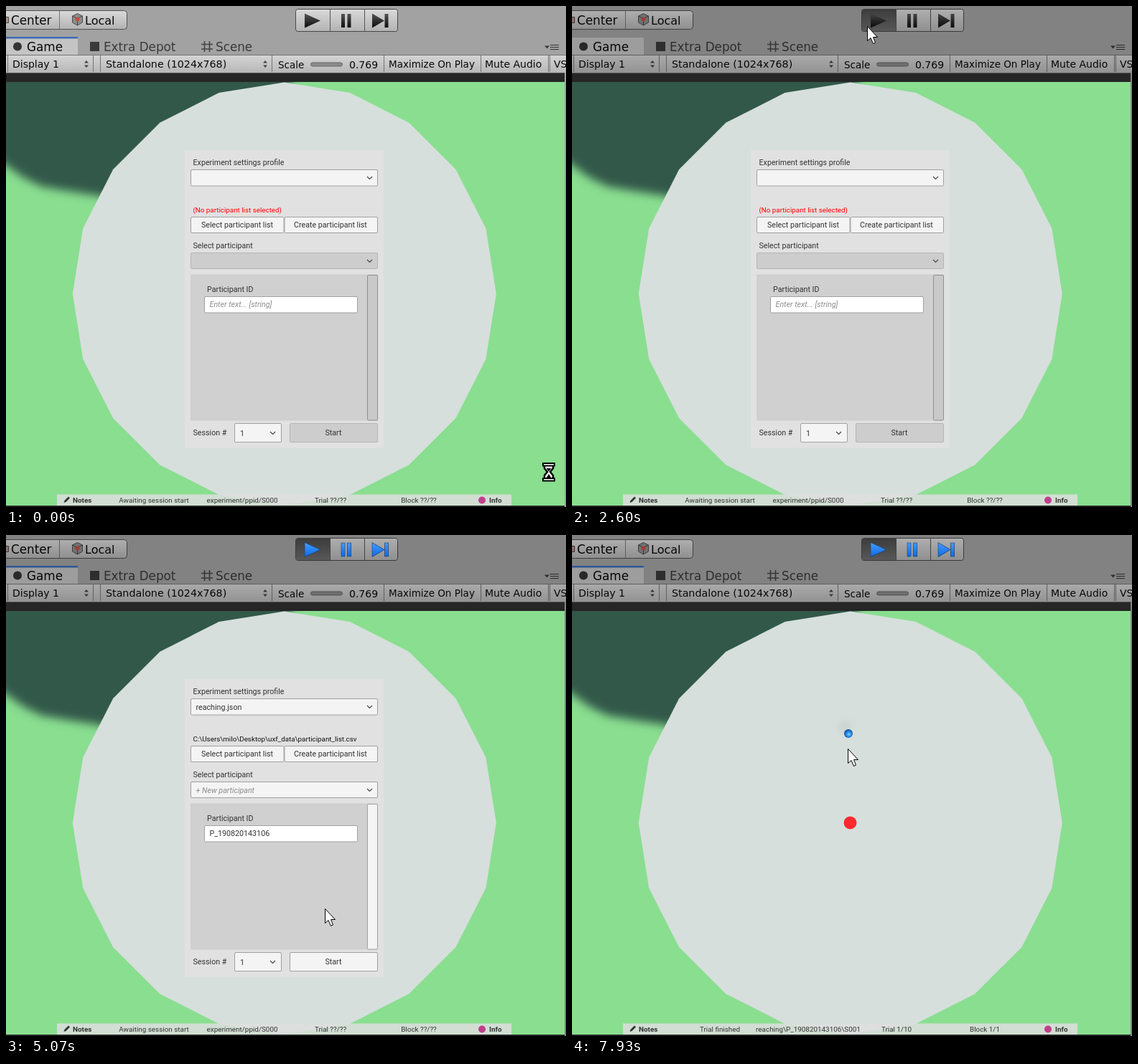
An HTML page that plays this animation: 780 px wide and 699 px high, repeating every 8000 ms.

```html
<!DOCTYPE html>
<html lang="en">
<head>
<meta charset="utf-8">
<title>Reaching experiment</title>
<style>
html, body { margin: 0; width: 100%; height: 100%; overflow: hidden; background: #a2a2a2; }
svg { display: block; width: 780px; height: 699px; }
.chrome { font: 14px "DejaVu Sans", sans-serif; fill: #080808; }
.big { font-size: 16.8px; }
.ui { font: 10.7px Roboto, sans-serif; fill: #323232; }
.small { font-size: 9.8px; }
.bar { font-size: 9.9px; }
.bold { font-weight: bold; }
.hint { font-style: italic; fill: #8c8c8c; }
.mid { text-anchor: middle; }
.box { fill: #f4f4f4; stroke: #a0a0a0; }
.off { fill: #cdcdcd; stroke: #b5b5b5; }
.track { fill: #c9c9c9; stroke: #8f8f8f; }
.chev { fill: none; stroke: #444; stroke-width: 1.2; }
.sep { stroke: #757575; fill: none; }
</style>
</head>
<body>
<svg viewBox="0 0 780 699">
  <defs>
    <linearGradient id="row" x2="0" y2="1"><stop stop-color="#d4d4d4"/><stop offset="1" stop-color="#b7b7b7"/></linearGradient>
    <linearGradient id="btn" x2="0" y2="1"><stop stop-color="#dadada"/><stop offset="1" stop-color="#b2b2b2"/></linearGradient>
    <linearGradient id="down" x2="0" y2="1"><stop stop-color="#4c4c4c"/><stop offset="1" stop-color="#6e6e6e"/></linearGradient>
    <linearGradient id="ink" x2="0" y2="1"><stop stop-color="#555"/><stop offset="1" stop-color="#0c0c0c"/></linearGradient>
    <linearGradient id="glow" x2="0" y2="1"><stop stop-color="#459cff"/><stop offset="1" stop-color="#0c6ae4"/></linearGradient>
    <radialGradient id="sphere" cx=".55" cy=".58"><stop stop-color="#8ad0ff"/><stop offset=".5" stop-color="#2a92ee"/><stop offset="1" stop-color="#14589f"/></radialGradient>
    <filter id="soft" x="-20%" y="-20%" width="140%" height="140%"><feGaussianBlur stdDeviation="6.500"/></filter>
    <filter id="puff" x="-50%" y="-50%" width="200%" height="200%"><feGaussianBlur stdDeviation="4"/></filter>
    <clipPath id="view"><path d="M0 106H778V697H0z"/></clipPath>
    <path id="arrows" d="M0-1.5l3-3.5 3 3.5zM0 1.5l3 3.5 3-3.5z" fill="#444"/>
    <g id="transport">
      <path d="M416 10.500L438 20.500L416 30.500z"/>
      <path d="M467 11h5v19h-5zM475.500 11h5v19h-5z"/>
      <path d="M510 10.500L527 20.500L510 30.500zM527.500 11h5v19h-5z"/>
    </g>
  </defs>

  <rect width="780" height="699" fill="#a2a2a2"/>

  <!-- editor toolbar -->
  <g class="chrome">
    <rect x="-6" y="6.500" width="174.500" height="26" rx="4" fill="url(#btn)" stroke="#505050"/>
    <path class="sep" d="M74.500 7V32"/>
    <path d="M-2 15.500H3.500V23.500H-2" fill="#b98c88" stroke="#444"/>
    <text class="big" x="7" y="26">Center</text>
    <path d="M99.500 10.500l7 3.500v9l-7 4-7-4v-9z" fill="#8d8d8d" stroke="#4c4c4c"/>
    <path d="M92.500 14l7 3.500 7-3.500M99.500 17.500V27" fill="none" stroke="#444"/>
    <circle cx="99.500" cy="18.500" r="2.800" fill="#d0463c"/>
    <text x="110" y="26" font-size="16">Local</text>

    <rect x="403.500" y="4.500" width="142" height="31" rx="3" fill="url(#btn)" stroke="#484848"/>
    <path id="pressed" d="M404 6q0-1 2-1H451V35H406q-2 0-2-2z" fill="url(#down)"/>
    <path d="M451.500 5V35M499.500 5V35" stroke="#555"/>
    <use href="#transport" fill="url(#ink)"/>

    <rect y="44" width="100" height="26" fill="#c4c4c4"/>
    <rect id="focus" y="43" width="100" height="2.500" fill="#3b6cb9"/>
    <circle cx="16" cy="56.500" r="6" fill="#333"/>
    <text class="big" x="29" y="63">Game</text>
    <g fill="#3a3a3a">
      <rect x="117" y="50" width="13" height="13"/>
      <text class="big" x="136" y="63">Extra Depot</text>
      <path d="M276.500 49V64M283.500 49V64M272 53.500H288M272 60H288" stroke="#444" stroke-width="1.600"/>
      <text class="big" x="292" y="63">Scene</text>
      <path d="M750 55.500h7l-3.500 4z"/>
      <path d="M758 54.500h12M758 57.500h12M758 60.500h12" stroke="#333"/>
    </g>

    <rect y="69" width="780" height="24" fill="url(#row)"/>
    <path class="sep" d="M0 68.500H780M2.500 69V92M121.500 69V92M131.500 69V92M370.500 69V92M526.500 69V92M661.500 69V92M755.500 69V92M757.500 69V92"/>
    <text x="9" y="86">Display 1</text>
    <use href="#arrows" x="109" y="81"/>
    <text x="139" y="86" font-size="14.250">Standalone (1024x768)</text>
    <use href="#arrows" x="358" y="81"/>
    <text x="379" y="87" font-size="13.500">Scale</text>
    <rect x="424.500" y="79" width="44" height="5" rx="2.500" fill="#8b8b8b" stroke="#666"/>
    <text x="478" y="87">0.769</text>
    <text x="533" y="86" font-size="13.500">Maximize On Play</text>
    <text x="667" y="86">Mute Audio</text>
    <text x="763" y="86">VSync</text>
  </g>
  <g id="tint">
    <rect width="780" height="93" fill="#000" opacity=".2"/>
    <rect x="778" y="93" width="2" height="606" fill="#828282"/>
  </g>
  <use id="live" href="#transport" fill="url(#glow)" stroke="#1c3f6b" stroke-width=".6"/>

  <!-- game view -->
  <rect y="93" width="778" height="13" fill="#262626"/>
  <path d="M0 93.500H778" stroke="#555"/>
  <rect y="106" width="778" height="591" fill="#8ade90"/>
  <g clip-path="url(#view)">
    <path filter="url(#soft)" fill="#31594a" d="M-40 60H396V300L200 282L130 265L85 258L50 252L25 240L0 222L-40 194z"/>
    <polygon id="disc" fill="#d6dfdc"/>
  </g>
  <rect y="697" width="778" height="2" fill="#262626"/>

  <circle id="home" cx="387.500" cy="401.500" r="9"/>
  <circle id="target" cx="387.500" cy="287" r="9" fill="#f4f4f4"/>
  <ellipse id="burst" cx="380" cy="267" rx="9" ry="8" fill="#c3cdc9" filter="url(#puff)"/>
  <circle id="ball" r="6" fill="url(#sphere)"/>

  <!-- start-up panel -->
  <g id="panel" class="ui">
    <rect x="249" y="201" width="277" height="415.500" fill="#e1e1e1"/>
    <rect class="box" x="257.500" y="228.500" width="260" height="22.500" rx="1.500"/>
    <rect class="box" x="257.500" y="294.500" width="129.500" height="22" rx="1.500"/>
    <rect class="box" x="388" y="294.500" width="129.500" height="22" rx="1.500"/>
    <rect id="picker" x="257.500" y="344.500" width="260" height="22" rx="1.500"/>
    <rect class="box" x="318.500" y="582.500" width="65" height="26" rx="1.500"/>
    <rect id="start" x="395.500" y="582.500" width="122" height="26" rx="1.500"/>
    <path class="chev" d="M503 238l3.500 3.500 3.500-3.500M503 354l3.500 3.500 3.500-3.500M368 594l3.500 3.500 3.500-3.500"/>
    <g id="words">
      <rect x="257" y="374.500" width="261" height="204" fill="#d0d0d0"/>
      <rect id="scroll" x="503.500" y="375.500" width="14" height="202.500" rx="1.500"/>
      <rect x="276.500" y="405.500" width="213" height="22.500" rx="1.500" fill="#fff" stroke="#a0a0a0"/>
      <text x="260.500" y="222">Experiment settings profile</text>
      <text x="272" y="309">Select participant list</text>
      <text x="401" y="309">Create participant list</text>
      <text x="260.500" y="338">Select participant</text>
      <text x="280" y="399">Participant ID</text>
      <text x="260.500" y="599">Session #</text>
      <text x="326" y="599.500">1</text>
      <text class="mid" x="456" y="599">Start</text>
      <g id="empty">
        <text class="small" x="260.500" y="287.500" fill="#f00">(No participant list selected)</text>
        <text class="hint" x="283.500" y="420">Enter text... [string]</text>
      </g>
      <g id="filled">
        <text x="264.500" y="244">reaching.json</text>
        <text class="small" x="260.500" y="287.500" fill="#111">C:\Users\milo\Desktop\uxf_data\participant_list.csv</text>
        <text class="hint" x="264.500" y="359.500">+ New participant</text>
        <text x="283.500" y="420">P_190820143106</text>
      </g>
    </g>
  </g>

  <!-- status bar -->
  <rect x="71" y="681.500" width="633" height="15.500" fill="#dfdfdf" opacity=".86"/>
  <path d="M80.500 693l1-3 5.500-5.500 2 2-5.500 5.500z" fill="#333"/>
  <circle cx="663" cy="689.500" r="5" fill="#c0408c"/>
  <g id="status" class="ui bar">
    <text class="bold" x="93" y="693">Notes</text>
    <text class="mid" id="phase" x="206" y="693"></text>
    <text class="mid" id="folder" x="329" y="693"></text>
    <text class="mid" id="trial" x="452" y="693"></text>
    <text class="mid" id="block" x="575" y="693"></text>
    <text class="bold" x="673" y="693">Info</text>
  </g>

  <g id="cursor">
    <path id="arrow" d="M.5.500V20.500L5 16.500L8.500 24.500L11.500 23L8.500 15.500H14.500z" fill="#fff" stroke="#000"/>
    <g id="wait" stroke="#000" fill="#fff">
      <path d="M3 3V8L7 13L3 18V23H15V18L11 13L15 8V3z" stroke-width="2.500"/>
      <path d="M1 1h16v3.500h-16zM1 22h16v3.500h-16z" stroke-width="2"/>
      <path d="M5.500 8h7L9 12.500zM5.500 21.500L9 16l3.500 5.500z" fill="#000" stroke="none"/>
    </g>
  </g>
</svg>
<script>
const $ = id => document.getElementById(id);
const show = (id, on) => $(id).style.display = on ? '' : 'none';
const move = (id, [x, y]) => $(id).setAttribute('transform', `translate(${x} ${y})`);
const style = (id, name) => $(id).setAttribute('class', name);

$('disc').setAttribute('points', Array.from({ length: 20 }, (_, i) => {
  const a = i * Math.PI / 10;
  return [387.8 + 295 * Math.cos(a), 401.5 + 295 * Math.sin(a)];
}).join(' '));

// Waypoints: time in ms, x, y
const cursorPath = [
  [0, 747, 637], [867, 405, 24], [933, 411, 19], [2533, 411, 19], [2600, 411, 28],
  [3400, 401, 183], [3867, 393, 221], [4200, 392, 236], [4333, 394, 240],
  [4800, 425, 400], [5067, 444, 521], [5133, 447, 556], [5333, 453, 583],
  [5933, 453, 585], [6000, 447, 574], [6733, 393, 398], [7400, 393, 398], [7933, 384, 298]
];
const ballPath = [[0, 455, 582], [6000, 455, 582], [6733, 391, 402], [7400, 391, 402], [7933, 385, 277]];

function at(path, t) {
  const i = path.findIndex(p => p[0] > t);
  if (i < 0) return path.at(-1).slice(1);
  const [t0, x0, y0] = path[i - 1], [t1, x1, y1] = path[i];
  const k = (t - t0) / (t1 - t0);
  return [x0 + (x1 - x0) * k, y0 + (y1 - y0) * k];
}

function draw(t) {
  const playing = t > 1390, live = t > 4300, session = t > 5460;
  const amber = t > 6720, go = t > 7260, done = t > 7860;
  const blank = t > 60 && !playing || t > 4190 && !live;

  show('tint', playing);
  show('pressed', playing);
  show('live', live);
  show('focus', !playing || t > 4190);

  show('words', !blank);
  show('status', !blank);
  show('empty', !live);
  show('filled', live);
  style('picker', live ? 'box' : 'off');
  style('start', live ? 'box' : 'off');
  style('scroll', live ? 'box' : 'track');
  $('panel').style.opacity = Math.max(0, Math.min(1, (5667 - t) / 267));

  $('phase').textContent = done ? 'Trial finished' : go ? 'Trial in progress'
    : session ? 'Awaiting trial start' : 'Awaiting session start';
  $('folder').textContent = session ? 'reaching\\P_190820143106\\S001' : 'experiment/ppid/S000';
  $('trial').textContent = go ? 'Trial 1/10' : 'Trial ??/??';
  $('block').textContent = go ? 'Block 1/1' : 'Block ??/??';

  show('home', session);
  $('home').setAttribute('fill', done || !amber ? '#ff2a2e' : go ? '#2fd04a' : '#ffb020');
  show('target', go && !done);
  show('burst', done);
  $('burst').style.opacity = t > 7900 ? .6 : 1;
  show('ball', session);
  move('ball', at(ballPath, t));

  show('cursor', t < 1120 || playing);
  show('wait', t < 60);
  show('arrow', t > 60);
  move('cursor', at(cursorPath, t).map(Math.round));
}

function tick() {
  const t = performance.now() % 8000;
  draw(Math.round(Math.floor((t + 4) * .015) / .015));
  requestAnimationFrame(tick);
}
tick();
</script>
</body>
</html>
```
